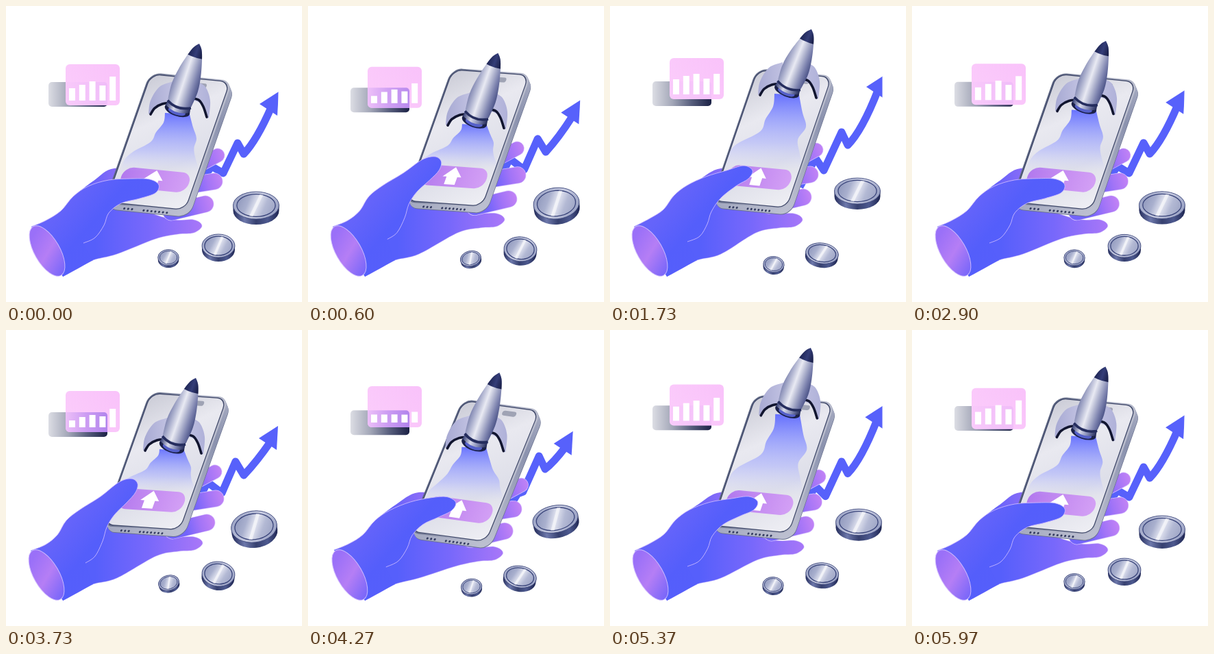
Animation of 432 by 432 pixels, one loop 6.01 s. Source, as an HTML page with a canvas:

```html
<!DOCTYPE html>
<html lang="en">
<head>
<meta charset="utf-8">
<title>Launch</title>
<style>
  html, body { margin: 0; width: 100%; height: 100%; overflow: hidden; background: #fff; }
  canvas { display: block; width: 100vw; height: 100vh; }
</style>
</head>
<body>
<canvas id="stage"></canvas>
<script>
const SIZE = 432, LOOP = 6010, CYCLE = LOOP / 2;
const canvas = document.getElementById('stage');
const ctx = canvas.getContext('2d');
const scale = Math.max(1, window.devicePixelRatio || 1);
canvas.width = canvas.height = SIZE * scale;

// Periodic monotone cubic through (times, values).
function track(times, values, t) {
  const n = times.length;
  const time = i => times[((i % n) + n) % n] + Math.floor(i / n) * CYCLE;
  const val = i => values[((i % n) + n) % n];
  const slope = i => (val(i + 1) - val(i)) / (time(i + 1) - time(i));
  const tangent = i => {
    const a = slope(i - 1), b = slope(i);
    return a * b <= 0 ? 0 : 2 * a * b / (a + b);
  };
  let i = n - 1;
  while (i > 0 && times[i] > t) i--;
  const h = time(i + 1) - time(i), s = (t - time(i)) / h, r = 1 - s;
  return val(i) * (1 + 2 * s) * r * r + tangent(i) * h * s * r * r
       + val(i + 1) * s * s * (3 - 2 * s) - tangent(i + 1) * h * s * s * r;
}

// Poses: rest, thumb lifted, button pressed, lift-off.
const KEYS = [0, 725, 1200, 1730];
const nums = s => s.trim().split(/[\s,]+/).map(Number);
const poses = (...rows) => {
  const p = rows.map(nums);
  return t => p[0].map((_, i) => track(KEYS, p.map(r => r[i]), t));
};
const pairs = a => a.reduce((out, v, i) => (i % 2 ? out[out.length - 1].push(v) : out.push([v]), out), []);

const phoneAt = poses(
  '210,97 331,109 143,288', '210,90 326,98 140,286',
  '226,101 342,117 146,296', '214,91 327,102 147,286');
const fingersAt = poses(
  '309,218 304,256 291,289 276,321', '305,207 306,246 293,281 277,311',
  '312,227 301,262 288,294 275,326', '301,210 292,246 282,279 271,312');
const handAt = poses(
  '37,322 58,313 80,299 98,278 120,263 150,254 185,252 210,253 223,261 218,273 195,281 168,288 150,302 143,320 130,338 113,346',
  '36,322 58,313 75,299 88,278 108,262 138,243 165,222 183,217 192,224 189,237 176,252 158,270 147,288 141,308 130,330 116,340',
  '38,321 60,312 80,299 98,278 120,263 150,251 180,245 203,244 216,252 210,264 190,274 168,284 152,300 145,318 132,337 114,346',
  '35,322 58,310 78,297 93,277 112,262 140,249 170,240 195,233 208,240 202,252 185,262 162,280 148,300 142,318 131,336 113,344');
const trendAt = poses(
  '280,262 300,234 317,244 338,200 347,216 366,196 398,125',
  '280,250 294,222 315,238 335,192 347,212 366,192 397,140',
  '296,255 306,240 314,236 337,184 346,203 358,194 386,150',
  '277,264 300,222 312,240 338,184 347,203 368,182 402,100');
const cardsAt = poses('85 111 .12', '89 120 .85', '83 118 .9', '76 110 .08');
const barsAt = poses('18 23 28 22 35', '10 15 18 16 27', '11 11 11 11 15', '22 27 30 23 30');
const axisAt = poses('-32 97', '-35 100', '-37 105', '-36 90');
const coinsAt = [   // centre, vertical radius, tilt
  [33.5, 8, poses('365 291 20 0', '362 287 23 -.12', '361 277 20 -.2', '361 270 19 0')],
  [24, 6, poses('310 350 17 0', '310 356 18 .1', '309.5 360 16 .17', '309.5 361 15 .15')],
  [15.2, 3.5, poses('237 367 11.5 0', '237.5 369 11 -.25', '238.5 374 11.5 -.1', '239 377 11.5 .1')]
];
const TIP_T = [0, 265, 725, 900, 1200, 1300, 1495, 1730, 2125, 2350, 2630, 2900];
const TIP_X = [282, 280, 277, 277, 277, 281, 288, 294, 294, 293, 288, 283];
const TIP_Y = [55, 64, 70, 71, 69, 58, 41, 34, 28, 26, 36, 51];

function grad(x0, y0, x1, y1, ...stops) {
  const g = ctx.createLinearGradient(x0, y0, x1, y1);
  stops.forEach((c, i) => g.addColorStop(i / (stops.length - 1), c));
  return g;
}
function fill(style) { ctx.fillStyle = style; ctx.fill(); }
function stroke(style, width) { ctx.strokeStyle = style; ctx.lineWidth = width; ctx.stroke(); }
function poly(pts, closed) {
  ctx.beginPath();
  pts.forEach(p => ctx.lineTo(...p));
  if (closed) ctx.closePath();
}
function box(x, y, w, h, r) { ctx.beginPath(); ctx.roundRect(x, y, w, h, r); }
function oval(x, y, rx, ry, a = 0) { ctx.beginPath(); ctx.ellipse(x, y, rx, ry, a, 0, 7); }

// Catmull-Rom curve appended to the current path.
function curve(pts) {
  const at = i => pts[Math.max(0, Math.min(pts.length - 1, i))];
  ctx.lineTo(...pts[0]);
  for (let i = 0; i < pts.length - 1; i++) {
    const [a, b, c, d] = [at(i - 1), at(i), at(i + 1), at(i + 2)];
    ctx.bezierCurveTo(b[0] + (c[0] - a[0]) / 6, b[1] + (c[1] - a[1]) / 6,
      c[0] - (d[0] - b[0]) / 6, c[1] - (d[1] - b[1]) / 6, c[0], c[1]);
  }
}
function layer(draw) { ctx.save(); draw(); ctx.restore(); }

function drawCards(t) {
  const [py, gy, mix] = cardsAt(t);
  box(62, gy, 86, 36, 5);
  fill(grad(62, 0, 148, 0, '#dcdde4', '#a3a7b8', '#565d7c', '#1b2145'));
  box(87, py, 79, 60, 6);
  fill(grad(87, py + 60, 166, py, '#fbcdfb', '#f9c2fa'));
  layer(() => {
    ctx.clip();
    ctx.globalAlpha = mix;
    box(62, gy, 86, 36, 5);
    fill(grad(87, 0, 148, 0, '#eabdf8', '#c394f1', '#a579ea'));
  });
  barsAt(t).forEach((h, i) => {
    ctx.beginPath();
    ctx.rect(92 + i * 14.8, py + 53 - h, 9, h);
    fill('#fff');
  });
}

function drawTrend(t) {
  const p = pairs(trendAt(t)), [x, y] = p[6];
  layer(() => {
    ctx.beginPath();
    ctx.rect(0, 0, 397.5, SIZE);
    ctx.clip();
    poly(p.slice(0, 5));
    ctx.quadraticCurveTo(...p[5], x - 11, y + 23);
    ctx.lineJoin = 'round';
    stroke('#5761fb', 11);
    poly([[x, y], [x - 28, y + 18], [x - 2, y + 35]], true);
    fill('#5761fb');
  });
}

function drawCoin(rx, thick, [x, y, ry, tilt]) {
  layer(() => {
    ctx.translate(x, y);
    ctx.rotate(tilt);
    const rim = grad(-rx, 0, rx, 0, '#252d5c', '#6d78ab', '#36406f', '#4d598f', '#1d2450');
    ctx.beginPath();
    ctx.ellipse(0, thick, rx, ry, 0, 0, Math.PI);
    ctx.ellipse(0, 0, rx, ry, 0, Math.PI, 2 * Math.PI);
    ctx.closePath();
    fill(rim);
    oval(0, 0, rx, ry);
    fill(grad(-rx, -ry, rx, ry, '#8f98bd', '#c9cde2', '#8d96bc'));
    stroke('#3c467a', 0.8);
    oval(0, 0, rx * 0.84, ry * 0.82);
    fill(grad(-rx * .7, -ry * .5, rx * .7, ry * .5, '#959dc0', '#a9b0ce', '#e3e5f1', '#b3b9d4', '#a2a9c8'));
    stroke('#39447a', rx > 20 ? 1.3 : 0.9);
    ctx.clip();
    poly([[rx * .22, -ry], [rx * .38, -ry], [-rx * .2, ry], [-rx * .36, ry]], true);
    fill('rgba(255,255,255,.55)');
  });
}

function drawBackHand(t) {
  const tips = pairs(fingersAt(t)), [px, py] = tips[3];
  const h = pairs(handAt(t)), ph = phoneAt(t);
  // Palm edge beyond the phone's left side
  ctx.beginPath();
  curve([h[3], [128, 255], [ph[4] + 15, 237], [210, 245]]);
  ctx.lineTo(200, 300);
  ctx.lineTo(110, 300);
  fill(grad(110, 0, 190, 0, '#5b5ffb', '#a173f6'));

  ctx.beginPath();
  curve([[83, 395], [105, 383], [127, 371], [162, 362], [px - 58, py + 19], [px - 25, py + 12],
    [px - 2, py + 10], [px + 10, py], [px - 2, py - 9], [px - 40, py - 11], [150, 280]]);
  ctx.lineTo(90, 300);
  fill(grad(130, 0, 285, 0, '#565ffb', '#7868fb', '#a877f8'));
  stroke('rgba(205,185,255,.55)', 0.8);

  tips.slice(0, 3).forEach(([x, y], i) => {
    const r = [10, 12, 12][i];
    const from = [[-30, 16], [-50, 8], [-50, 12]][i];
    poly([[x + from[0], y + from[1]], [x, y]]);
    ctx.lineCap = 'round';
    stroke('#d6c0ff', 2 * r + 0.8);
    stroke(grad(x - 32, y + 8, x + r, y - 4, '#7264fb', '#a274f7', '#c383f5'), 2 * r - 0.6);
  });
  ctx.lineCap = 'butt';
}

function drawFlame(bx, by, foot) {
  const end = foot[1] + 4, h = end - by, cx = foot[0];
  const left = [[bx - 18, by + 4], [bx - 20, by + h * .2], [bx - 31, by + h * .36],
    [bx - 39, by + h * .52], [cx - 40, by + h * .68], [cx - 53, by + h * .82], [cx - 58, end]];
  const right = [[cx + 57, end], [cx + 51, by + h * .78], [cx + 49, by + h * .62],
    [bx + 28, by + h * .46], [bx + 23, by + h * .28], [bx + 18, by + 6]];
  ctx.beginPath();
  curve(left);
  curve(right);
  fill(grad(0, by, 0, end, 'rgba(88,100,255,.95)', 'rgba(130,140,255,.75)',
    'rgba(165,172,255,.5)', 'rgba(200,205,255,0)'));
}

function drawPhone(t, bx, by) {
  const [x, y, x1, y1, x2, y2] = phoneAt(t);
  const W = 120, H = 192;
  const m = [(x1 - x) / W, (y1 - y) / W, (x2 - x) / H, (y2 - y) / H];
  const at = (u, v) => [x + m[0] * u + m[2] * v, y + m[1] * u + m[3] * v];
  const local = (draw, dx = 0, dy = 0) => layer(() => {
    ctx.transform(...m, x + dx, y + dy);
    draw();
  });

  const side = grad(0, 0, W, H, '#c9cbd9', '#8b92ae', '#bfc2d2');
  for (let i = 9; i > 0; i--) local(() => {
    box(0, 0, W, H, 16);
    fill(i > 8 ? '#69718f' : side);
  }, i * 0.4, i);
  local(() => {
    for (let i = 0; i < 12; i++) {
      if (i === 3 || i === 4) continue;
      oval(31 + i * 5.6, H + 4.5, 1.5, 1.6);
      fill('#343c60');
    }
    box(0, 0, W, H, 16);
    fill(grad(0, 0, W, 0, '#59627f', '#a6abc0', '#b9bccc'));
    box(1.8, 1.6, W - 4.5, H - 3.2, 14.5);
    fill('#3f4869');
    box(3, 2.8, W - 7, H - 5.6, 13.5);
    fill(grad(0, 0, W, H, '#c9cad5', '#e9e9f0', '#dedfe9', '#f0f0f5'));
    box(65, 8, 21, 7, 3.5);
    fill('#9fa3b4');
    box(11, 137, 98, 29, 14);
    fill(grad(11, 0, 109, 0, '#b279ee', '#c58df1', '#d3a0f5'));
    ctx.translate(57, 151);
    poly([[1, -13], [14, 1], [8, 1], [8, 12], [-8, 12], [-8, 1], [-14, 1]], true);
    fill('#fff');
  });
  layer(() => {
    ctx.beginPath();
    poly([at(3, 3), at(W - 4, 3), at(W - 4, H - 3), at(3, H - 3)], true);
    ctx.clip();
    drawFlame(bx, by, at(62, 135));
  });
}

function drawFins(bx, by) {
  layer(() => {
    ctx.translate(bx, by);
    const shade = grad(-40, 0, 50, 0, '#a9abd4', '#c9c9e6', '#aeb0d8');
    const fin = (outer, inner, lip) => {
      ctx.beginPath();
      curve(outer);
      curve(inner);
      ctx.closePath();
      fill(shade);
      ctx.beginPath();
      curve(lip);
      ctx.lineCap = 'round';
      stroke('#11152f', 3.6);
    };
    fin([[-6, -42], [-26, -34], [-39, -14], [-42, 5]], [[-38, 8], [-29, -5], [-8, -10]],
      [[-39, 6], [-33, -3], [-22, -9], [-8, -11]]);
    fin([[28, -42], [41, -34], [48, -14], [46, 11]], [[43, 12], [38, -7], [20, -16]],
      [[18, -18], [31, -15], [38, -5], [43, 10]]);
  });
}

function drawRocket(tx, ty, bx, by) {
  const len = Math.hypot(bx - tx, by - ty), s = len / 100;
  layer(() => {
    ctx.translate(tx, ty);
    ctx.rotate(Math.atan2(tx - bx, by - ty));
    ctx.scale(1, s);
    oval(0, 100, 19, 8.5);
    fill('#1a2048');
    oval(0, 102, 13, 5);
    fill('#5560c9');
    const hull = () => {
      ctx.beginPath();
      curve([[0, 0], [6, 7], [11, 20], [17, 43], [20, 66], [18, 89]]);
      ctx.quadraticCurveTo(0, 98, -18, 89);
      curve([[-18, 89], [-20, 66], [-17, 43], [-11, 20], [-6, 7], [0, 0]]);
    };
    ctx.beginPath();
    ctx.moveTo(-17, 88);
    ctx.lineTo(-18.5, 98);
    ctx.quadraticCurveTo(0, 108, 18.5, 98);
    ctx.lineTo(17, 88);
    fill(grad(-18, 0, 18, 0, '#3a4377', '#d8daea', '#8188b3', '#232a58'));
    ctx.beginPath();
    ctx.moveTo(-18, 91);
    ctx.quadraticCurveTo(0, 101, 18, 91);
    stroke('#252d5e', 3.5);
    hull();
    fill(grad(-20, 0, 20, 0, '#8288b2', '#b4b8d3', '#e9eaf3', '#b2b6d0', '#7c82ae', '#4c5488'));
    ctx.clip();
    ctx.beginPath();
    ctx.moveTo(-22, -2);
    ctx.lineTo(22, -2);
    ctx.lineTo(22, 17);
    ctx.quadraticCurveTo(0, 24, -22, 17);
    fill(grad(-11, 0, 11, 0, '#1d2452', '#343d78', '#151a40'));
  });
}

function drawFrontHand(t) {
  const p = pairs(handAt(t)), [wx] = p[0];
  ctx.beginPath();
  curve(p);
  ctx.lineTo(127, 371);
  ctx.lineTo(83, 395);
  ctx.closePath();
  fill(grad(75, 300, 150, 365, '#6564fa', '#545efb', '#565ffb'));
  ctx.beginPath();
  curve([p[15], [127, 371], [83, 395]]);
  ctx.beginPath();
  curve(p);
  stroke('rgba(208,190,255,.85)', 1);
  layer(() => {
    ctx.translate(wx + 23, 357.5);
    ctx.rotate(-0.52);
    oval(0, 0, 18.5, 41);
    fill(grad(-15, -25, 16, 30, '#9a70f8', '#b57ef5', '#7d68f9'));
    stroke('rgba(214,196,255,.9)', 1);
  });
}

function draw(t) {
  const tx = track(TIP_T, TIP_X, t), ty = track(TIP_T, TIP_Y, t);
  const [ax, ay] = axisAt(t), bx = tx + ax, by = ty + ay;
  ctx.setTransform(scale, 0, 0, scale, 0, 0);
  ctx.fillStyle = '#fff';
  ctx.fillRect(0, 0, SIZE, SIZE);
  drawCards(t);
  drawTrend(t);
  coinsAt.forEach(([rx, thick, at]) => drawCoin(rx, thick, at(t)));
  drawBackHand(t);
  drawPhone(t, bx, by);
  drawFins(bx, by);
  drawRocket(tx, ty, bx, by);
  drawFrontHand(t);
}

const start = performance.now();
function frame() {
  draw((performance.now() - start) % LOOP % CYCLE);
  requestAnimationFrame(frame);
}
frame();
</script>
</body>
</html>
```
